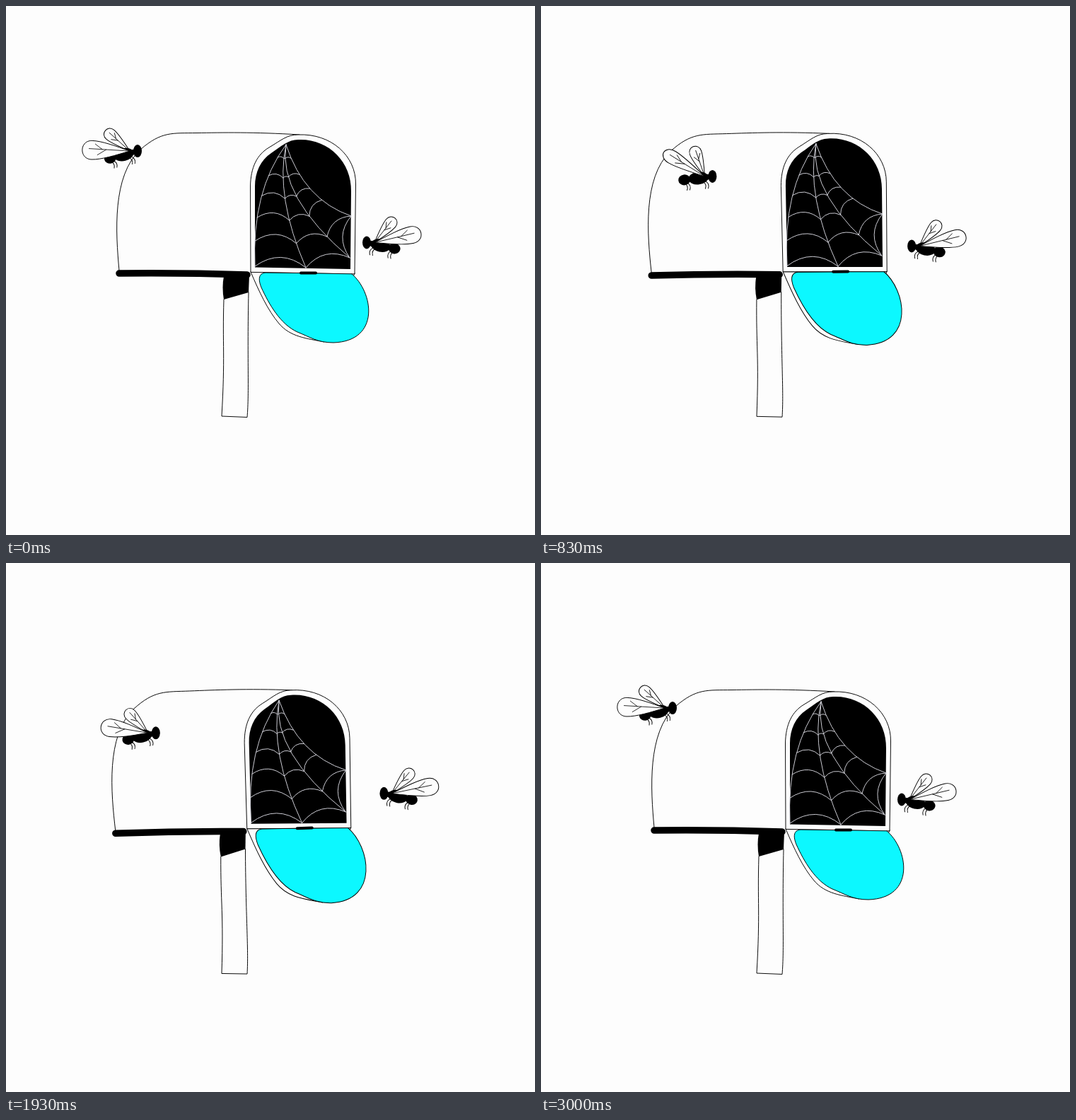
These frames come from a looping animation (748 by 748 pixels, 3030 ms). An HTML page with a canvas:

```html
<!DOCTYPE html>
<html lang="en">
<head>
<meta charset="utf-8">
<title>Empty mailbox</title>
<style>
html, body { margin: 0; width: 100%; height: 100%; overflow: hidden; background: #fdfdfd; }
canvas { display: block; width: 748px; height: 748px; }
</style>
</head>
<body>
<canvas id="stage"></canvas>
<script>
const PAPER = '#fdfdfd', INK = '#000', CYAN = '#0cf8ff', SILK = '#d4d4dc';
const LOOP = 3030, CYCLE = 3000, STEP = 100 / 3;
const { PI, sin, cos } = Math;
const rad = degrees => degrees * PI / 180;

const canvas = document.getElementById('stage');
const ctx = canvas.getContext('2d');
const ratio = window.devicePixelRatio || 1;
canvas.width = canvas.height = 748 * ratio;

const shape = {
  shell: new Path2D('M160 374C155 320 150 240 190 203C220 177 235 180 270 179.5S350 178 415 182'),
  bar: new Path2D('M160 378Q250 377 341 380'),
  arch: new Path2D('M346 376L345.5 255C346 228 355 210 372 200S397 182 413 182C460 180 495 212 494.5 252L493 378.500Z'),
  hollow: new Path2D('M352 369.500V255C352 235 360 218 375 208S399 189 413 189C455 187 489 220 488 262L487 372Z'),
  latch: new Path2D('M417 377.500H438'),
  bracket: new Path2D('M308 382Q305 398 308 415L343 405L344 380Z'),
  post: new Path2D('M308 415C306 480 310 495 305 580L341 581.500C344 545 341 500 343 405'),
  lid: new Path2D('M346 376C358 404 370 430 386 449S425 470 450 475L493 378Z'),
  panel: new Path2D('M367 377C356 378 357 388 361 398C372 422 388 450 412 461C430 468 440 476 463 476C530 474 520 404 488 378Z')
};

function fill(path, color) { ctx.fillStyle = color; ctx.fill(path); }
function line(path, color = INK, width = .95) {
  ctx.strokeStyle = color;
  ctx.lineWidth = width;
  ctx.stroke(path);
}
function oval(x, y, rx, ry) {
  const path = new Path2D();
  path.ellipse(x, y, rx, ry, 0, 0, PI * 2);
  fill(path, INK);
}

// Web: strands fan out from the apex, rings sag between neighbours
const apex = [396, 196];
const strands = [
  { bend: [347, 262], end: [352, 368] },
  { bend: [380, 269], end: [424, 370] },
  { bend: [384, 269], end: [486, 356] },
  { bend: [421, 274], end: [488, 297] }
];
const RINGS = 6;

function along({ bend, end }, u) {
  return apex.map((a, i) => a * (1 - u) ** 2 + 2 * u * (1 - u) * bend[i] + u * u * end[i]);
}

function makeWeb() {
  const web = new Path2D();
  strands.forEach((strand, s) => {
    web.moveTo(...apex);
    web.quadraticCurveTo(...strand.bend, ...strand.end);
    const next = strands[s + 1];
    if (!next) return;
    for (let ring = 1; ring <= RINGS; ring++) {
      const u = .13 + .174 * (ring - 1);
      const nextU = next === strands[3] && ring > 4 ? 1 : u;
      const [x, y] = along(strand, u), [nx, ny] = along(next, nextU);
      const sag = .38;
      web.moveTo(x, y);
      web.quadraticCurveTo((x + nx) / 2 + (ny - y) * sag, (y + ny) / 2 - (nx - x) * sag, nx, ny);
    }
  });
  return web;
}
const web = makeWeb();

function drawMailbox(swing) {
  ctx.save();
  ctx.translate(323, 581);
  ctx.rotate(rad(-1.82 * swing));
  ctx.translate(-323, -581);
  line(shape.post);
  fill(shape.bracket, INK);

  // The lid drops a little further as the box leans
  ctx.save();
  ctx.translate(0, 377);
  ctx.scale(1, 1 + .103 * swing);
  ctx.translate(0, -377);
  fill(shape.lid, PAPER);
  line(shape.lid);
  fill(shape.panel, CYAN);
  line(shape.panel);
  ctx.restore();

  line(shape.shell);
  line(shape.bar, INK, 9.5);
  fill(shape.arch, PAPER);
  line(shape.arch);
  fill(shape.hollow, INK);
  line(web, SILK);
  line(shape.latch, INK, 4);
  ctx.restore();
}

function drawWing(angle, length, half) {
  ctx.save();
  ctx.translate(-11, 0);
  ctx.rotate(rad(angle));
  const at = (u, v) => `${-u * length} ${v * half} `;
  const outline = new Path2D('M0 0C' + at(.3, -.5) + at(.6, -1) + at(.8, -1) +
    'C' + at(1.07, -1) + at(1.07, 1) + at(.8, 1) + 'C' + at(.6, 1) + at(.3, .5) + '0 0Z');
  const veins = new Path2D('M0 0L' + at(.86, -.15) + 'M' + at(.5, -.08) + 'L' + at(.68, .5) +
    'M' + at(.58, -.1) + 'L' + at(.73, -.65));
  fill(outline, PAPER);
  line(outline);
  line(veins, INK, .8);
  ctx.restore();
}

function drawLegs(x, y) {
  for (const step of [0, 4]) {
    line(new Path2D(`M${x - step} ${y}q5 4 2 10`));
  }
}

function drawBee({ x, y, beats }, facing) {
  const lift = 16 - 14.5 * cos(beats * PI * 2);
  ctx.save();
  ctx.translate(x, y);
  ctx.scale(facing, 1);
  drawWing(lift + 38.5, 45, 8.5);
  ctx.save();
  ctx.rotate(rad(.26 * lift - 15));
  drawLegs(-10, 6);
  drawLegs(-36, 5);
  oval(-40, 0, 8.5, 7.5);
  oval(-20, 0, 14, 9);
  oval(-8, 0, 6, 4);
  ctx.restore();
  oval(0, 0, 6, 9);
  drawWing(lift, 67, 13.5 - .13 * lift);
  ctx.restore();
}

// Flight paths are closed loops built from a few harmonics of the cycle
function leftBee(p) {
  return {
    x: 213 - 8.5 * cos(p) - 18.5 * cos(2 * p) + 9.5 * sin(p) - 3.5 * sin(2 * p),
    y: 228.6 - 18.5 * cos(p) - 5 * cos(2 * p) + 5.8 * sin(p) + 3.8 * sin(2 * p),
    beats: 12 * p / (2 * PI) + .1 * (1 - cos(p)) + .06 * sin(p)
  };
}
function rightBee(p) {
  return {
    x: 531.5 + cos(p) - 4.5 * cos(2 * p) - 10 * cos(3 * p) - 8 * cos(4 * p) -
      2.5 * sin(p) - 4 * sin(3 * p) - 2 * sin(4 * p),
    y: 331 + 3.5 * cos(p) + 8.5 * sin(p) + 3 * sin(2 * p) - 2 * sin(3 * p),
    beats: 14 * p / (2 * PI) - .05 + .25 * cos(p)
  };
}

function draw(now) {
  const t = Math.min(CYCLE, Math.floor((now % LOOP + 4) / STEP) * STEP);
  const p = t / CYCLE * PI * 2;
  ctx.setTransform(ratio, 0, 0, ratio, 0, 0);
  ctx.fillStyle = PAPER;
  ctx.fillRect(0, 0, 748, 748);
  ctx.lineCap = ctx.lineJoin = 'round';
  drawMailbox((1 - cos(p)) / 2);
  drawBee(leftBee(p), 1);
  drawBee(rightBee(p), -1);
}

const start = performance.now();
function tick() {
  draw(performance.now() - start);
  requestAnimationFrame(tick);
}
tick();
</script>
</body>
</html>
```
